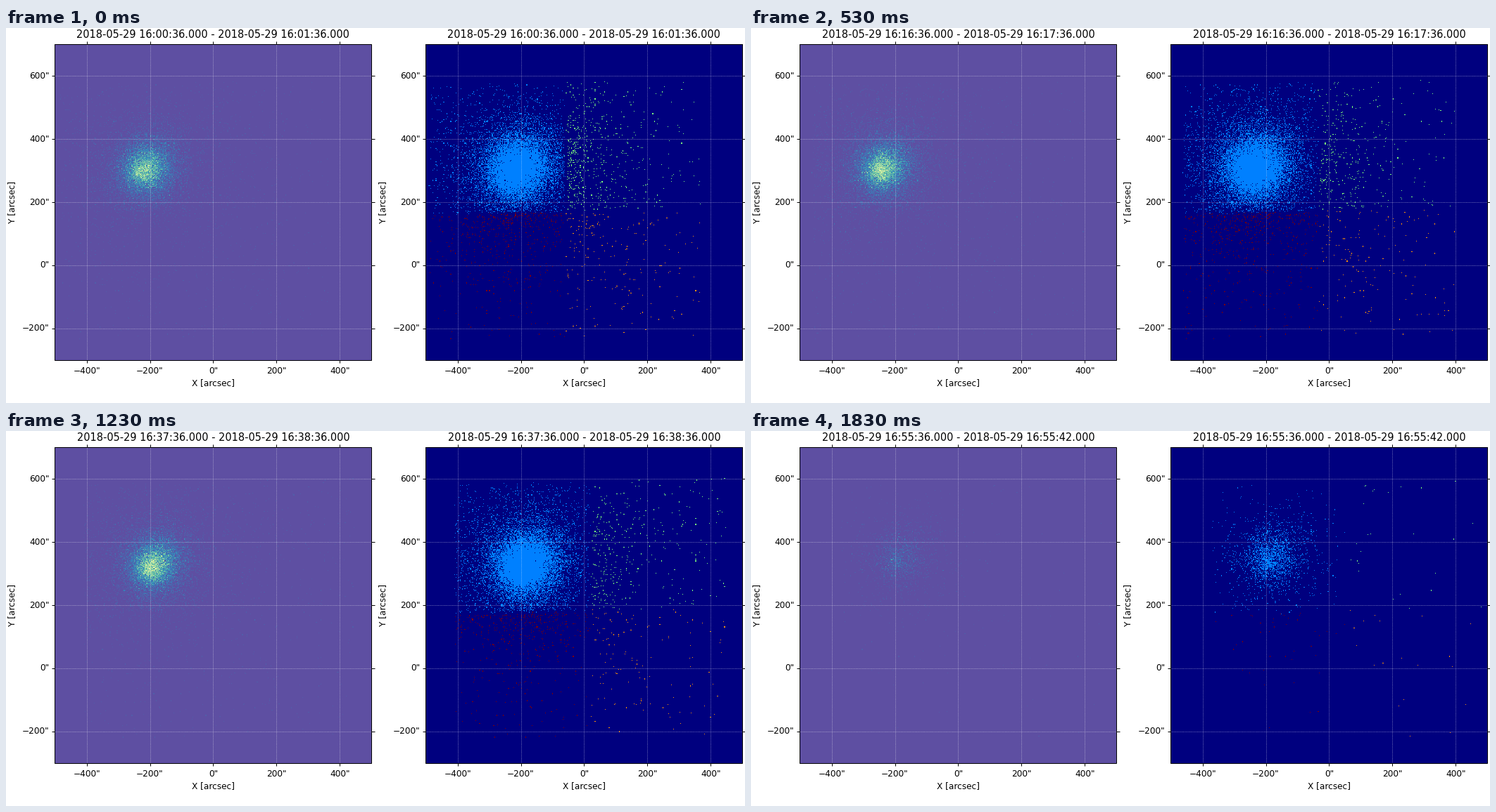
Recreate the animation shown at these times as a matplotlib script. Size 1050 px wide and 534 px high, loop 1860 ms.

```python
import numpy as np
import matplotlib.pyplot as plt
from matplotlib.animation import FuncAnimation
from matplotlib.patches import Rectangle

W, H = 1050, 534
LAST = 55                     # minutes covered
TICK_MS = 10
LOOP_MS = 1860
BINS = 407
SPAN = 1001.2                 # arcsec across a panel
SIDE = 450.0                  # panel size in pixels
TOP = 23.0
LEFTS = (69.4, 596.4)
SCALE = SIDE / SPAN
SMALL, LARGE = 8.7, 10.44     # font sizes

plt.rcParams["font.family"] = "DejaVu Sans"

# Pointing and source drift over the observation
MINUTES = [0, 10, 16, 25, 37, 43, 55]
GAP_X = [-59, -43, -34, -8, 20, 42, 57]
GAP_Y = [165, 165, 168, 172, 177, 175, 175]
SRC_X = [-212, -235, -235, -217, -186, -172, -184]
SRC_Y = [306, 304, 308, 317, 328, 337, 351]
PEAK = [2.5, 4.0, 4.0, 9.0, 4.5, 4.0, 4.0]

axis = (np.arange(BINS) + 0.5) * SPAN / BINS - SPAN / 2
X, Y = np.meshgrid(axis, axis + 200)


def track(keys, minute):
    return np.interp(minute, MINUTES, keys)


def blob(x, y, amp, sigma, stretch=1.0):
    """Gaussian, lengthened along the rising diagonal."""
    u = (X - x + Y - y) / (np.sqrt(2) * stretch)
    v = (X - x - Y + y) / np.sqrt(2)
    return amp * np.exp(-(u * u + v * v) / (2 * sigma * sigma))


def expose(minute):
    """Photon counts and detector number for one exposure."""
    rng = np.random.default_rng(500 + minute)
    gx, gy = track(GAP_X, minute), track(GAP_Y, minute)
    sx, sy = track(SRC_X, minute), track(SRC_Y, minute)

    rate = blob(sx, sy, 5.0, 39, 1.06)
    rate += blob(sx - 12, sy - 13, track(PEAK, minute), 21)
    rate += blob(sx + 6, sy + 6, 1.45, 65, 1.1)
    rate += blob(sx, sy, 0.085, 170) + 0.0042

    dx = X - gx + rng.normal(0, 3, X.shape)
    dy = Y - gy - 0.025 * (X - gx + 200) + rng.normal(0, 3, X.shape)
    if minute == 25:          # pointing jump inside this exposure
        dx = dx + np.where(rng.random(X.shape) < 0.2, 62, 0)

    right, upper = dx > 0, dy > 0
    detector = np.where(upper, np.where(right, 2, 1), np.where(right, 3, 4))
    gain = np.array([0, 1, 1, 0.9, 0.75])[detector]
    inside = (dx > -427) & (dx < 430) & (dy > -400) & (dy < 408)
    inside &= (np.abs(dx) > 4) & (np.abs(dy) > 2)
    time = 0.12 if minute == LAST else 1.0

    counts = rng.poisson(rate * gain * inside * time)
    hits = np.where(counts > 0, detector, 0)
    return counts.astype(np.uint8), hits.astype(np.uint8)


def title(minute):
    stop = "16:55:42" if minute == LAST else f"16:{minute + 1:02d}:36"
    day = "2018-05-29"
    return f"{day} 16:{minute:02d}:36.000 - {day} {stop}.000"


def label(value):
    return f"{value}\"".replace("-", "\u2212")


def panel(left, cmap, vmax):
    right, bottom = left + SIDE, TOP + SIDE
    mid_x, mid_y = left + SIDE / 2, TOP + SIDE / 2
    image = ax.imshow(np.zeros((BINS, BINS), np.uint8), cmap=cmap, vmin=0,
                      vmax=vmax, origin="lower", interpolation="nearest",
                      extent=(left, right, bottom, TOP), aspect="auto")
    grid = dict(color="white", alpha=0.6, ls=":", lw=0.6, zorder=2)
    mark = dict(color="black", lw=0.7, solid_capstyle="butt", zorder=3)
    for v in (-400, -200, 0, 200, 400):
        x = mid_x + v * SCALE
        ax.plot([x, x], [bottom, TOP], **grid)
        ax.plot([x, x], [bottom, bottom + 4.3], **mark)
        ax.plot([x, x], [TOP, TOP - 4.3], **mark)
        ax.text(x, 482, label(v), size=SMALL, ha="center", va="top")
    for v in (-200, 0, 200, 400, 600):
        y = mid_y - (v - 200) * SCALE
        ax.plot([left, right], [y, y], **grid)
        ax.plot([left, left - 4.3], [y, y], **mark)
        ax.plot([right, right + 4.3], [y, y], **mark)
        ax.text(left - 8, y, label(v), size=SMALL, ha="right", va="center")
    ax.add_patch(Rectangle((left, TOP), SIDE, SIDE, fill=False, lw=0.7,
                           ec="black", zorder=4))
    ax.text(mid_x, 505.5, "X [arcsec]", size=SMALL, ha="center", va="center")
    ax.text(left - 61, mid_y, "Y [arcsec]", size=SMALL, rotation=90,
            ha="center", va="center")
    head = ax.text(mid_x, 14.2, "", size=LARGE, ha="center", va="baseline")
    return image, head


fig = plt.figure(figsize=(W / 100, H / 100), dpi=100, facecolor="white")
ax = fig.add_axes([0, 0, 1, 1])
count_img, count_head = panel(LEFTS[0], "Spectral_r", 34)
det_img, det_head = panel(LEFTS[1], "jet", 4)
ax.set_xlim(0, W)
ax.set_ylim(H, 0)
ax.axis("off")

exposures = [expose(m) for m in range(LAST + 1)]


def update(n):
    # 30 exposures per second, rounded to 10 ms steps
    minute = min(int(0.3 * n + 0.15), LAST)
    counts, hits = exposures[minute]
    count_img.set_data(counts)
    det_img.set_data(hits)
    for head in (count_head, det_head):
        head.set_text(title(minute))
    return count_img, det_img, count_head, det_head


anim = FuncAnimation(fig, update, frames=LOOP_MS // TICK_MS, interval=TICK_MS,
                     repeat=True, repeat_delay=0, blit=False)
plt.show()
```
